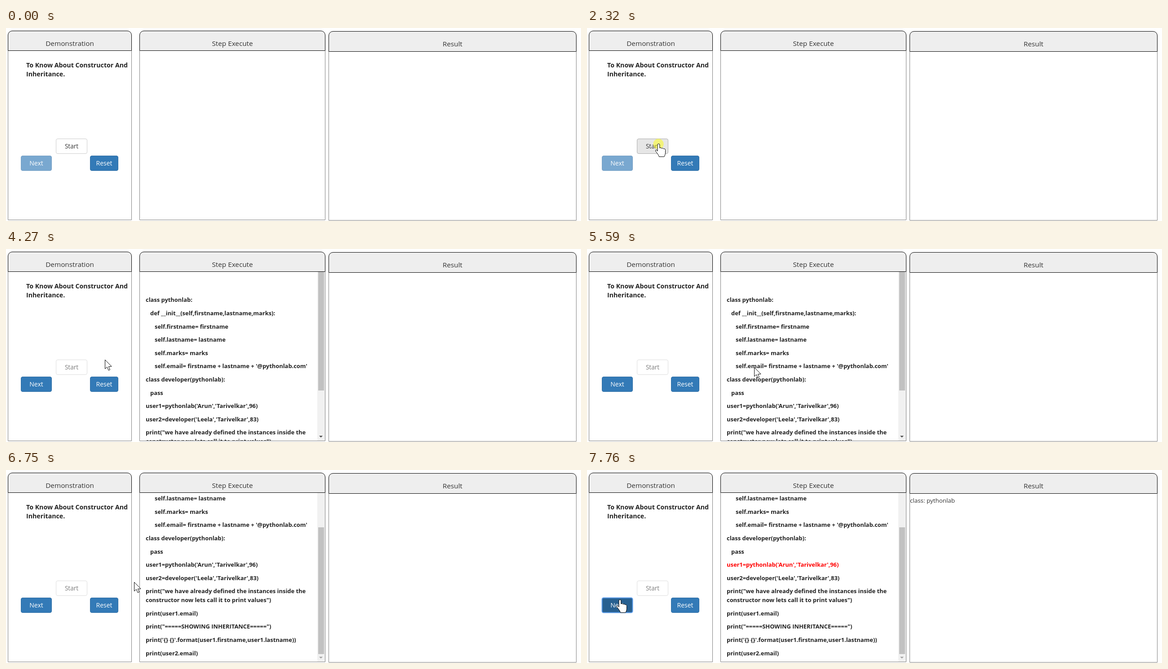
Recreate the animation shown at these times as an HTML page. Size 1280 px wide and 431 px high, loop 8000 ms.

```html
<!DOCTYPE html>
<html lang="en">
<head>
<meta charset="utf-8">
<title>Constructor and inheritance</title>
<style>
html, body { margin: 0; width: 100%; height: 100%; overflow: hidden; background: #fff; }
svg { display: block; font-family: "Open Sans", "Noto Sans", sans-serif; fill: #333; }
.head { font-size: 15.3px; text-anchor: middle; }
.head path { fill: #eee; stroke: #000; }
.frame { fill: none; stroke: #808080; }
.goal { font-size: 14.2px; font-weight: 700; fill: #222; }
#code { font-size: 12.9px; font-weight: 700; fill: #222; }
.btn { font-size: 14px; text-anchor: middle; }
.btn rect { fill: #337ab7; stroke: #2e6da4; }
.btn text { fill: #fff; }
.btn.hover rect { fill: #286090; stroke: #204d74; }
#start { font-size: 13.6px; }
#start rect { fill: #fff; stroke: #ccc; }
#start.hover rect { fill: #e6e6e6; stroke: #adadad; }
#start text { fill: #333; }
.btn.off { opacity: .65; }
#next.focus rect { stroke: #5b9bea; stroke-width: 2; }
#result { font-size: 13.4px; }
#arrow, #hand { fill: #fff; stroke: #000; }
#beam { fill: none; stroke: #222; }
#no { fill: #fff; stroke: #d40b0b; stroke-width: 3.2; }
</style>
</head>
<body>
<svg id="stage" width="1280" height="431" viewBox="0 0 1280 431">
  <clipPath id="view"><rect x="298" y="51" width="412" height="377"/></clipPath>
  <g id="panels"></g>
  <text class="goal" x="45" y="88">To Know About Constructor And</text>
  <text class="goal" x="45" y="108">Inheritance.</text>
  <g id="buttons"></g>
  <g id="listing" clip-path="url(#view)">
    <g id="code"></g>
    <rect x="693" y="51" width="17" height="377" fill="#f1f1f1"/>
    <rect id="thumb" x="695" width="13" height="283" fill="#c1c1c1"/>
    <path id="down" d="M697 417h8l-4 4z"/>
  </g>
  <text id="result" x="719" y="73">class: pythonlab</text>
  <circle id="click" r="11.7" fill="#ff0" fill-opacity=".47"/>
  <g id="cursor">
    <path id="arrow" d="M.5 .5V20.5L5 16.5L8.5 24L11.5 22.5L8.4 15.6L15 15.2Z"/>
    <path id="hand" d="M-2 16V2a2.4 2.4 0 0 1 4.8 0V9q2.4-2 4.4.8 2.6-1.6 4.2 1 3.6-1 4.1 2.6V20q0 3.6-2.6 8.5H1.5q-.5-3-4-7.5l-3.6-4.6q-1.4-3 1.2-3.4 1.8 0 2.9 3z"/>
    <path id="beam" d="M-3.5-9.5H-1Q.5-9.5 .5-8V8Q.5 9.5-1 9.5H-3.5M4.5-9.5H2Q.5-9.5 .5-8M.5 8Q.5 9.5 2 9.5H4.5"/>
    <g id="no"><circle r="9"/><path d="M-6.3-6.3L6.3 6.3"/></g>
  </g>
</svg>
<script>
const $ = id => document.getElementById(id);
const show = (id, on) => $(id).style.display = on ? "" : "none";

function panel(title, left, right, top, split, bottom) {
  $("panels").innerHTML += `
    <path class="frame" d="M${left} ${split}V${bottom}H${right}V${split}"/>
    <g class="head">
      <path d="M${left} ${split}V${top + 9.5}a9.5 9.5 0 0 1 9.5-9.5H${right - 9.5}a9.5 9.5 0 0 1 9.5 9.5V${split}z"/>
      <text x="${(left + right) / 2}" y="${top + 33}">${title}</text>
    </g>`;
}
panel("Demonstration", 4.5, 279.5, 6.5, 50.5, 428.5);
panel("Step Execute", 297.5, 710.5, 6.5, 50.5, 428.5);
panel("Result", 718.5, 1269.5, 7.5, 52.5, 429.5);

const boxes = {
  start: ["Start", 111.5, 247.5, 69],
  next: ["Next", 33.5, 285.5, 68],
  reset: ["Reset", 187.5, 285.5, 62]
};
for (const [id, [label, x, y, w]] of Object.entries(boxes)) {
  $("buttons").innerHTML += `<g id="${id}" class="btn">
    <rect x="${x}" y="${y}" width="${w}" height="33" rx="3.5"/>
    <text x="${x + w / 2}" y="${y + 21.5}">${label}</text></g>`;
}

// Leading spaces set the indent; "~" marks a wrapped line.
const source = `class pythonlab:
 def __init__(self,firstname,lastname,marks):
  self.firstname= firstname
  self.lastname= lastname
  self.marks= marks
  self.email= firstname + lastname + '@pythonlab.com'
class developer(pythonlab):
 pass
user1=pythonlab('Arun','Tarivelkar',96)
user2=developer('Leela','Tarivelkar',83)
print("we have already defined the instances inside the
~constructor now lets call it to print values")
print(user1.email)
print("=====SHOWING INHERITANCE=====")
print('{} {}'.format(user1.firstname,user1.lastname))
print(user2.email)`;
let baseline = 88.8;
for (const line of source.split("\n")) {
  baseline += line[0] === "~" ? 19.8 : 29.6;
  const text = document.createElementNS("http://www.w3.org/2000/svg", "text");
  text.setAttribute("x", 311 + 10 * line.search(/\S/));
  text.setAttribute("y", Math.round(baseline));
  text.textContent = line.replace("~", "").trim();
  $("code").append(text);
}
const activeLine = $("code").children[8];

// Pointer strokes: first change, last change, steps, from, bend, to.
const strokes = [
  [380, 610, 4, [1203, 440], [1028, 380], [854, 319]],
  [840, 1000, 3, [854, 319], [659, 285], [464, 251]],
  [1300, 1460, 3, [464, 251], [363, 247], [262, 243]],
  [1700, 2010, 5, [262, 243], [210, 251], [159, 259]],
  [4120, 4580, 7, [159, 259], [266, 228], [372, 264]],
  [6750, 6750, 1, [372, 264], [330, 250], [285, 250]],
  [6830, 7370, 8, [285, 250], [180, 246], [73, 290]]
];

function pointer(t) {
  const stroke = strokes.filter(s => t >= s[0]).pop();
  if (!stroke) return null;
  const [begin, end, steps, a, b, c] = stroke;
  const gap = (end - begin) / (steps - 1) || 1;
  const u = Math.min(steps, Math.floor((t - begin) / gap + 1.001)) / steps;
  return a.map((v, i) =>
    Math.round(v * (1 - u) ** 2 + 2 * b[i] * u * (1 - u) + c[i] * u * u));
}

const within = (t, from, to) => t >= from && t < to;

function draw(t) {
  const pos = pointer(t);
  const over = id => {
    const [, x, y, w] = boxes[id];
    return pos && within(pos[0], x, x + w) && within(pos[1], y, y + 33);
  };
  const loaded = t >= 2950, stepped = t >= 7760;
  const scroll = t < 5680 ? 0 : t < 5760 ? 90 : t < 5830 ? 138 : 139;

  let kind = "arrow";
  if (over("start")) kind = t < 2710 ? "hand" : "no";
  else if (over("next")) kind = loaded ? "hand" : "no";
  else if (over("reset")) kind = "hand";
  else if (loaded && pos[0] > 311 && !within(t, 5590, 5830)) kind = "beam";

  show("cursor", pos);
  for (const id of ["arrow", "hand", "beam", "no"]) show(id, id === kind);
  show("click", within(t, 2320, 2410) || within(t, 7690, 7760));
  if (pos) {
    $("cursor").setAttribute("transform", `translate(${pos})`);
    $("click").setAttribute("transform", `translate(${pos})`);
  }

  $("start").classList.toggle("off", loaded);
  $("start").classList.toggle("hover", !loaded && over("start"));
  $("next").classList.toggle("off", !loaded);
  $("next").classList.toggle("hover", loaded && over("next"));
  $("next").classList.toggle("focus", stepped);

  show("listing", loaded);
  show("result", stepped);
  $("code").setAttribute("transform", `translate(0 ${-scroll})`);
  $("thumb").setAttribute("y", Math.round(33 + scroll * 95 / 139));
  $("down").style.fill = scroll < 139 ? "#505050" : "#a3a3a3";
  activeLine.style.fill = stepped ? "red" : "";
}

const origin = performance.now();
function tick() {
  draw((performance.now() - origin) % 8000);
  requestAnimationFrame(tick);
}
tick();
</script>
</body>
</html>
```
